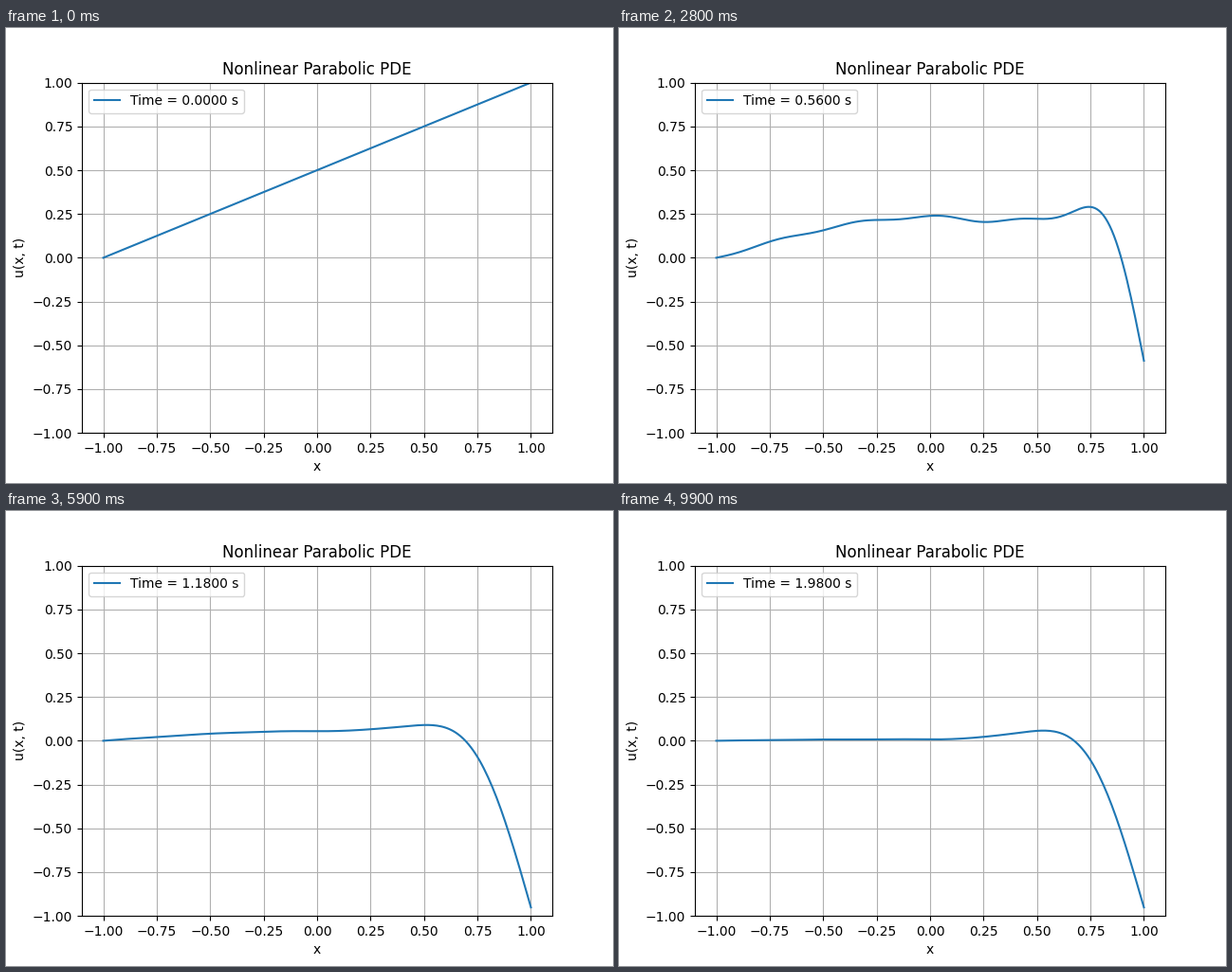
Animation of 640 by 480 pixels, one loop 10000 ms. Source, as a matplotlib script:

```python
import numpy as np
import matplotlib.pyplot as plt
from matplotlib.animation import FuncAnimation

FRAMES = 100
INTERVAL = 100      # ms
DT_FRAME = 0.02     # model seconds per frame
SUBSTEPS = 20
MODES = 10
REACTION = 1.2      # u_t = u_xx + REACTION * u^2
OMEGA = 20 * np.pi
SETTLE = 30.0       # decay rate of the start-up part at x = 1

x = np.linspace(-1, 1, 201)
s = (x + 1) / 2
n = np.arange(1, MODES + 1)
basis = np.sin(np.pi * np.outer(n, s))
decay = (n * np.pi / 2) ** 2
ramp = 2 * (-1.0) ** (n + 1) / (n * np.pi)   # sine coefficients of s
weights = np.full(x.size, 2 / (x.size - 1))
weights[[0, -1]] /= 2


def edge(t):
    return np.sin(OMEGA * t) + np.exp(-SETTLE * t)


def edge_rate(t):
    return OMEGA * np.cos(OMEGA * t) - SETTLE * np.exp(-SETTLE * t)


def profile(t, a):
    return edge(t) * s + a @ basis


def rhs(t, a):
    source = basis @ (weights * profile(t, a) ** 2)
    return REACTION * source - decay * a - edge_rate(t) * ramp


def rk4(t, a, h):
    k1 = rhs(t, a)
    k2 = rhs(t + h / 2, a + h / 2 * k1)
    k3 = rhs(t + h / 2, a + h / 2 * k2)
    k4 = rhs(t + h, a + h * k3)
    return a + h / 6 * (k1 + 2 * k2 + 2 * k3 + k4)


def solve():
    """Sine-Galerkin solution sampled once per frame."""
    a, h, rows = np.zeros(MODES), DT_FRAME / SUBSTEPS, []
    for k in range(FRAMES):
        t = k * DT_FRAME
        rows.append(profile(t, a))
        for j in range(SUBSTEPS):
            a = rk4(t + j * h, a, h)
    return rows


waves = solve()

fig, ax = plt.subplots(figsize=(6.4, 4.8), dpi=100)
line, = ax.plot(x, waves[0], label="Time = 0.0000 s")
ax.set_ylim(-1, 1)
ax.set_title("Nonlinear Parabolic PDE")
ax.set_xlabel("x")
ax.set_ylabel("u(x, t)")
ax.grid(True)
label = ax.legend(loc="upper left").get_texts()[0]


def update(k):
    line.set_ydata(waves[k])
    label.set_text(f"Time = {k * DT_FRAME:.4f} s")
    return line, label


anim = FuncAnimation(fig, update, frames=FRAMES, interval=INTERVAL,
                     repeat=True, repeat_delay=0, blit=False)
plt.show()
```
